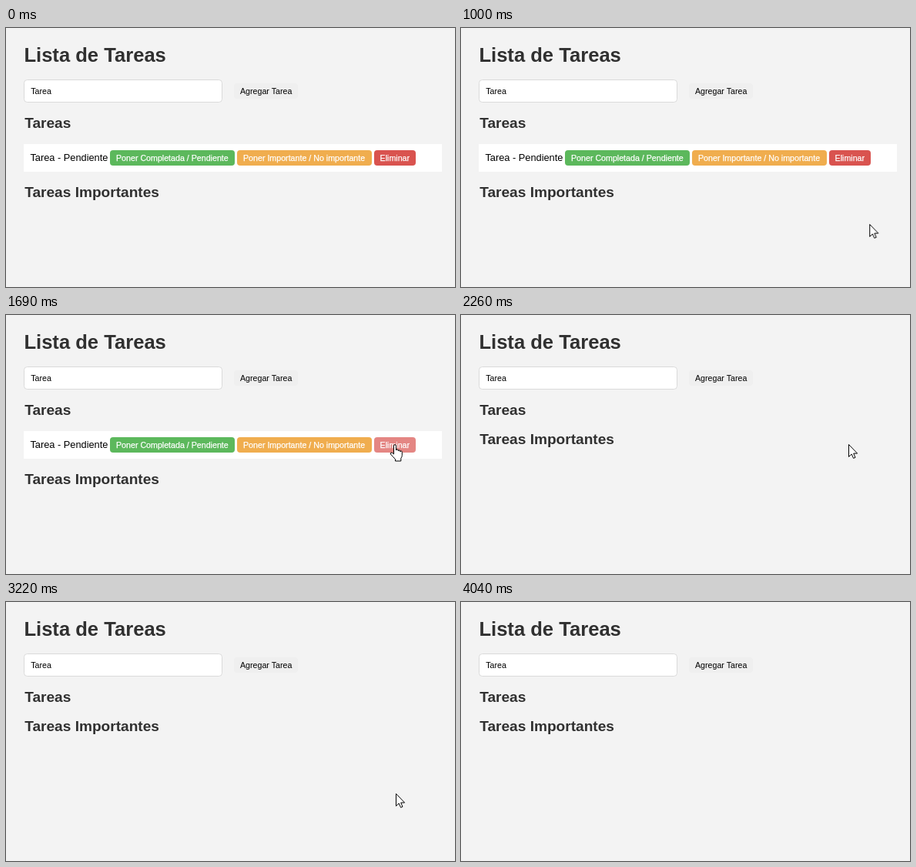
Write an HTML page that moves like this. It is 583 px wide and 337 px high and loops after 4.68 s.

```html
<!DOCTYPE html>
<html lang="es">
<head>
<meta charset="utf-8">
<title>Lista de Tareas</title>
<style>
  html, body { margin: 0; width: 100%; height: 100%; overflow: hidden; background: #f3f3f3; }
  svg { display: block; font: 10.667px "Liberation Sans", Arial, sans-serif; }
  .title, .heading { font-weight: bold; fill: #303030; }
  .title { font-size: 25.6px; }
  .heading { font-size: 19.1px; }
  .task { font-size: 12.8px; }
  .button text { fill: #fff; stroke: #fff; stroke-width: .25px; }
  #cursor { fill: #fff; stroke: #000; stroke-linejoin: round; }
</style>
</head>
<body>
<svg width="583" height="337" viewBox="0 0 583 337">
  <text class="title" x="23.4" y="44">Lista de Tareas</text>

  <rect x="23.5" y="67.5" width="257" height="29" rx="4" fill="#fff" stroke="#dadada"/>
  <text x="32.2" y="86">Tarea</text>
  <rect x="296" y="72" width="83" height="20" rx="4" fill="#efefef"/>
  <text x="304" y="86">Agregar Tarea</text>

  <text class="heading" x="24.2" y="130">Tareas</text>
  <g id="row">
    <rect x="23" y="151" width="543" height="36" fill="#fff"/>
    <text class="task" x="31.4" y="173">Tarea - Pendiente</text>
    <g class="button" transform="translate(135 159)">
      <rect width="162" height="20" rx="4" fill="#5cb85c"/>
      <text x="8" y="14">Poner Completada / Pendiente</text>
    </g>
    <g class="button" transform="translate(300 159)">
      <rect width="175" height="20" rx="4" fill="#f0ad4e"/>
      <text x="8" y="14">Poner Importante / No importante</text>
    </g>
    <g class="button" id="remove" transform="translate(478 159)">
      <rect width="54" height="20" rx="4" fill="#d9534f"/>
      <text x="7.6" y="14">Eliminar</text>
    </g>
  </g>
  <g id="important"><text class="heading" x="24.2" y="220">Tareas Importantes</text></g>

  <g id="cursor">
    <path id="arrow" d="M.5 .5V16.5L4.2 13L6.6 18.4L9 17.4L6.7 12.1H11.6Z"/>
    <path id="hand" transform="translate(-5 0)" d="M5.5 13V2.2a1.5 1.5 0 0 1 3 0V8a1.4 1.3 0 0 1 2.8 .3V9a1.3 1.2 0 0 1 2.6 .4V10a1.2 1.2 0 0 1 2.4 .5V14.5q0 2-1.5 4V22H7.5V19.7Q4.5 16.5 1.4 13q-.6-2 1.2-1.9q1.5 .2 2.9 1.9Z"/>
  </g>
</svg>
<script>
  const LOOP = 4680;
  const HOVER = 1420, REMOVED = 2180, RELEASED = 2260;
  const SPEED_UP = "cubic-bezier(.6, .2, .9, .6)";
  const SLOW_DOWN = "cubic-bezier(0, 0, .4, 1)";

  // Pointer strokes: start and end time, end position, easing.
  const strokes = [
    { from: 580, to: 1050, x: 523, y: 223, easing: SPEED_UP },
    { from: 1150, to: 1630, x: 501, y: 170, easing: SLOW_DOWN },
    { from: 1690, to: 1690, x: 503, y: 168 },
    { from: 2500, to: 2670, x: 500, y: 172 },
    { from: 2690, to: 2960, x: 498, y: 197 },
    { from: 3060, to: 3220, x: 506, y: 249 },
    { from: 3320, to: 3580, x: 510, y: 290 },
    { from: 3600, to: 4040, x: 514, y: 338 }
  ];

  const play = (id, frames) => document.getElementById(id).animate(
    frames, { duration: LOOP, iterations: Infinity });

  const movePointer = (id, x, y) => {
    const frame = (time, easing = "linear") => ({
      offset: time / LOOP, transform: `translate(${x}px, ${y}px)`, easing
    });
    const frames = [frame(0)];
    for (const stroke of strokes) {
      frames.push(frame(stroke.from, stroke.easing));
      ({ x, y } = stroke);
      frames.push(frame(stroke.to));
    }
    play(id, [...frames, frame(LOOP)]);
  };

  // Holds `before`, then `during` between the two times, then `before` again.
  const swap = (id, prop, before, during, start, end = LOOP) => play(id, [
    [0, before], [start, during], [end, end < LOOP ? before : during], [LOOP, before]
  ].map(([time, value]) => ({ offset: time / LOOP, [prop]: value, easing: "step-end" })));

  movePointer("cursor", 549, 338);
  swap("arrow", "opacity", 1, 0, HOVER, RELEASED);
  swap("hand", "opacity", 0, 1, HOVER, RELEASED);
  swap("remove", "opacity", 1, 0.7, HOVER);
  swap("row", "opacity", 1, 0, REMOVED);
  swap("important", "transform", "none", "translateY(-52px)", REMOVED);
</script>
</body>
</html>
```
